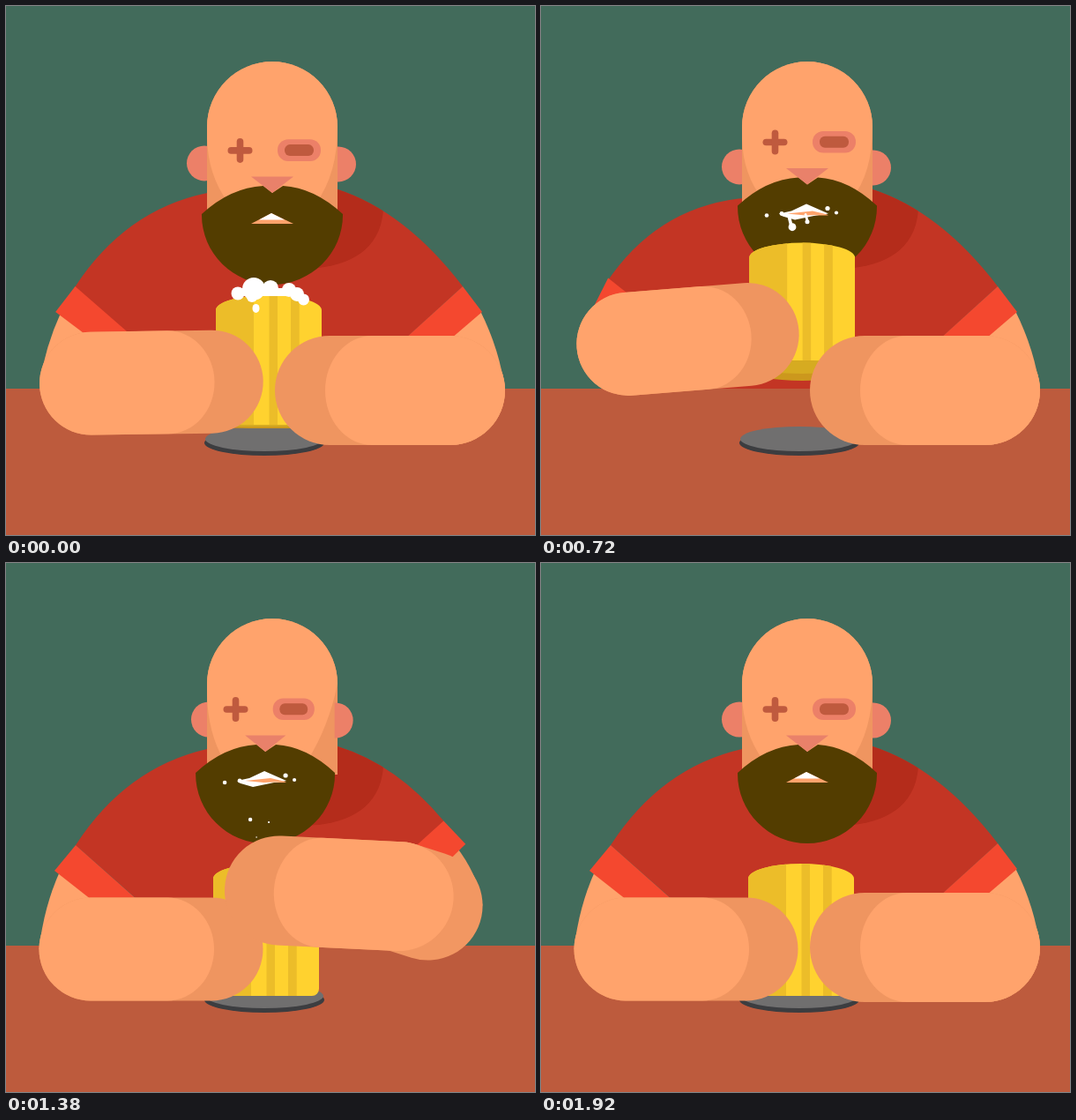
An HTML page with a canvas for the animation above (2190 ms loop, 600 by 600 pixels).

```html
<!DOCTYPE html>
<html lang="en">
<head>
<meta charset="utf-8">
<title>Beer at the bar</title>
<style>
html, body { margin: 0; height: 100%; overflow: hidden; background: #426b5b; }
canvas { display: block; width: 100vw; height: 100vh; }
</style>
</head>
<body>
<canvas id="stage" width="600" height="600"></canvas>
<script>
const ctx = document.getElementById('stage').getContext('2d');
const LOOP = 2190, STEP = 30, LAST = 1920;
const SKIN = '#ffa36c', SHADE = '#ef9560', RED = '#c33524', CUFF = '#f4482f';
const PINK = '#ec8068', BROWN = '#bf5a3e', BEARD = '#533d00', TABLE = '#bd5b3d';

const clamp = v => Math.min(1, Math.max(0, v));
const lerp = (a, b, k) => a + (b - a) * k;
const mix = (a, b, k) => [lerp(a[0], b[0], k), lerp(a[1], b[1], k)];
const ease = (t, start, span) => {
  const p = clamp((t - start) / span);
  return p * p * (3 - 2 * p);
};

function fill(color, d) {
  ctx.fillStyle = color;
  ctx.fill(new Path2D(d));
}
function oval(color, x, y, rx, ry = rx) {
  ctx.fillStyle = color;
  ctx.beginPath();
  ctx.ellipse(x, y, rx, ry, 0, 0, 7);
  ctx.fill();
}
function box(color, x, y, w, h, r = 0) {
  ctx.fillStyle = color;
  ctx.beginPath();
  ctx.roundRect(x, y, w, h, r);
  ctx.fill();
}
function shifted(x, y, draw) {
  ctx.save();
  ctx.translate(x, y);
  draw();
  ctx.restore();
}
function capsule(color, a, b, r) {
  ctx.strokeStyle = color;
  ctx.lineWidth = 2 * r;
  ctx.lineCap = 'round';
  ctx.beginPath();
  ctx.moveTo(...a);
  ctx.lineTo(...b);
  ctx.stroke();
}
// Shaded hand with a lighter, round-ended forearm over it
function forearm(elbow, hand, r, len) {
  capsule(SHADE, elbow, hand, r);
  shifted(...elbow, () => {
    ctx.rotate(Math.atan2(hand[1] - elbow[1], hand[0] - elbow[0]));
    ctx.fillStyle = SKIN;
    ctx.beginPath();
    ctx.arc(0, 0, r, Math.PI / 2, Math.PI * 1.5);
    ctx.ellipse(len, 0, 53, r, 0, -Math.PI / 2, Math.PI / 2);
    ctx.fill();
  });
}

function pose(t) {
  const lift = ease(t, -80, 400) - ease(t, 540, 400);
  const wipe = 1.058 * (ease(t, 1230, 350) - ease(t, 1600, 320));
  return {
    t, lift, wipe,
    elbowL: [96 + 5 * lift, 438 - 95 * lift],
    handL: [233 + 2 * lift, 438 - 114 * lift],
    elbowR: mix([504, 436], [364, 297], wipe),
    handR: mix([367, 436], [230, 281], wipe),
    upperR: mix([504, 436], [443, 322], wipe)
  };
}

function drawTorso({ lift, wipe, elbowL, upperR }) {
  const a = mix([79, 320], [70, 310], lift);
  const b = mix([518, 318], [466, 257], wipe);
  const shirt = `M${228 - 7 * lift} ${211 + 13 * lift}
    Q${136 - 11 * lift} ${232 - 3 * lift} ${a}
    L${mix([147, 380], [148, 398], lift)} L153 434 H442
    L${mix([450, 380], [442, 390], wipe)} L${b}
    Q${mix([453, 233], [430, 223], wipe)} 376 208Z`;
  fill(RED, shirt);
  ctx.save();
  ctx.clip(new Path2D(shirt));
  fill('#b42c1b', 'M300 190H428V228C427 270 398 292 355 297L300 300Z');
  ctx.restore();

  // Undersides of the raised sleeves, hidden by the table when low
  shifted(...elbowL, () => {
    const s = (1 - lift) * 70;
    fill(SKIN, `M-41 40Q-15 64 ${37 + s} 66L${36 + s} 40Z`);
    fill(CUFF, `M${30 + s} 55L${47 + s} 71L${49 + s} 45H30Z`);
  });
  shifted(...upperR, () => fill(CUFF, 'M-1 50L7 61L-2 90Z'));
}

function drawSleeves({ lift, wipe, elbowL, upperR }) {
  const [ex, ey] = elbowL;
  fill(SKIN, `M${mix([61, 350], [70, 335], lift)}
    Q${mix([43, 390], [62, 345], lift)} ${ex - 58.5} ${ey}
    L${ex} ${ey} L${mix([130, 380], [120, 330], lift)}Z`);
  fill(CUFF, `M${mix([79, 320], [74, 300], lift)} L${mix([55, 349], [66, 330], lift)}
    L${mix([97, 382], [110, 350], lift)} L${mix([149, 382], [130, 340], lift)}Z`);

  const tone = mix([163, 108], [149, 96], clamp(wipe * 2));
  const color = `rgb(${lerp(255, 239, clamp(wipe * 2))},${tone})`;
  const [ux, uy] = upperR;
  fill(color, `M${mix([538, 346], [470, 285], wipe)}
    Q${mix([560, 390], [500, 300], wipe)} ${ux + 62} ${uy}
    L${ux} ${uy} L${mix([480, 375], [440, 300], wipe)}Z`);
  fill(CUFF, `M${mix([518, 318], [466, 257], wipe)} L${mix([540, 347], [495, 279], wipe)}
    L${mix([505, 377], [480, 300], wipe)} L${mix([453, 377], [440, 280], wipe)}Z`);
  return color;
}

function drawFoamTraces(t) {
  const dot = (x, y, r) => oval('#fff', x, y, r);
  fill('#fff', 'M270 247L284 244L301 236L326 247L312 249L288 254L274 250Z');
  fill(SKIN, 'M279 247L308 244L325 248L300 249Z');
  [[256, 249, 2.3], [273, 247, 2.4], [325, 241, 2.6], [335, 246, 2.1], [285, 291, 2.2]]
    .forEach(d => dot(...d));
  if (t < 620) fill('#fff', 'M260 236L275 230L290 232L301 225L314 231L327 232L330 240H260Z');

  const grow = ease(t, 580, 240), shrink = 1 - ease(t, 900, 240);
  if (shrink > 0) {
    const y = 250 + 18 * grow, r = shrink;
    capsule('#fff', [281, 249], [284, lerp(249, y, r)], 1.8);
    dot(285, lerp(252, y + 1, r), 4.4 * r);
    capsule('#fff', [300, 248], [302, lerp(248, 249 + 9 * grow, r)], 1.4);
    dot(302, lerp(248, 250 + 10 * grow, r), 2.5 * r);
  }
  if (t > 960) {
    dot(306, 294, 1.1);
    dot(292, 311, .8);
  }
}

function drawHead({ t, lift, wipe }) {
  const earY = 177.5 + 8.5 * lift, dy = -20 * lift;
  oval(PINK, 225 + 12 * wipe, earY, 20);
  fill(SHADE, 'M228 137a74 74 0 0 1 148 0V240H228Z');
  fill(SKIN, `M228 137a74 74 0 0 1 148 0
    Q${mix([376, 190], [352, 180], wipe)} ${352 - 24 * wipe} ${224 + dy * .4}
    V236H${252 - 12 * wipe}V${224 + dy * .4}Q229 192 228 150Z`);
  shifted(376 - 8 * wipe, earY + 1, () => fill(PINK, 'M0 -20H1A20 20 0 0 1 1 20H0Z'));

  const bob = Math.sin(Math.PI * clamp((t + 60) / 540));
  const size = 1 + bob * 3 / 79;
  shifted(302 - 19 * wipe, 239 + dy, () => {
    ctx.scale(size, 1);
    fill(BEARD, `M-79 -1Q-47 -31 -10 -33L0 -25L12 -33Q47 -31 79 -1
      V0A79 79 0 0 1 -79 0Z`);
  });
  shifted(-19 * wipe, dy, () => {
    fill(SKIN, 'M278 249L301 237L326 249Z');
    fill('#fff', 'M287 244.5L301 237L316 244.5Z');
    if (t > 420 && t < 1560) drawFoamTraces(t);
  });

  const narrow = 1 - .09 * wipe;
  shifted(302 - 18.5 * wipe, 195.5 + dy, () => {
    ctx.scale(narrow, 1);
    fill('#e9816a', 'M-24 0H24L0 18.5Z');
  });
  shifted(265.5 - 12 * wipe, 166 + dy, () => {
    box(BROWN, -14, -3.8, 28, 7.6, 3.8);
    box(BROWN, -3.8, -14, 7.6, 28, 3.8);
  });
  shifted(332.5 - 15 * wipe, 165.7 + dy, () => {
    ctx.scale(narrow, 1);
    box(PINK, -24.5, -12.3, 49, 24.6, 12);
    box(BROWN, -16.5, -6.5, 33, 13, 6);
  });
}

function drawFoam(x, y) {
  shifted(x, y, () => {
    box('#fff', 26, -25, 67, 9);
    [[25, -19, 7.5], [43, -24, 13], [41, -15, 6], [62, -25, 9],
     [83, -23, 8], [92, -18, 8], [99.5, -12, 6.5]]
      .forEach(([cx, cy, r]) => oval('#fff', cx, cy, r));
    oval('#fff', 45.5, -2, 4, 5);
  });
}

function drawMug({ t, lift }) {
  const x = 235 + (t < 540 ? Math.max(2, 3 - t / 240) : 2 * lift);
  const top = 358 - 126 * lift, bottom = 491 - 135 * lift;
  const ry = 20 * lift, rim = Math.min(4, (1 - lift) * 40, ry / 2);
  const sipping = t > 300;
  if (sipping && t < 540) drawFoam(x, top + 22 * clamp((t - 300) / 210));

  ctx.save();
  ctx.beginPath();
  ctx.ellipse(x + 60, top, 60, 17, 0, Math.PI, 0);
  ctx.roundRect(x, top, 120, bottom - top, [0, 0, 8 * (1 - lift), 8 * (1 - lift)]);
  ctx.clip();
  box('#ffd22f', x, top - 20, 120, 200);
  [[0, 43], [60.5, 9.5], [85, 9.7]].forEach(([s, w]) => box('#ecbd29', x + s, top - 20, w, 200));
  ctx.restore();

  if (ry > .5) {
    oval('#cc981d', x + 60, bottom, 60, ry);
    oval('#d6ab21', x + 60, bottom - rim, 60, ry - rim);
  }
  if (!sipping) drawFoam(x, top);
}

function draw(t) {
  const p = pose(t);
  box('#426b5b', 0, 0, 600, 600);
  drawTorso(p);
  box(TABLE, 0, 434, 600, 166);
  oval('#3c3d40', 293, 495.5, 68, 14.5);
  oval('#706f6f', 293, 491, 67, 14);
  const upperColor = drawSleeves(p);
  drawHead(p);
  drawMug(p);
  forearm(p.elbowL, p.handL, 58.5, 87);
  capsule(upperColor, p.upperR, p.elbowR, 62);
  forearm(p.elbowR, p.handR, 62, 89);
}

const begin = performance.now();
function tick() {
  const t = (performance.now() - begin) % LOOP;
  draw(Math.min(LAST, Math.floor(t / STEP) * STEP));
  requestAnimationFrame(tick);
}
tick();
</script>
</body>
</html>
```
